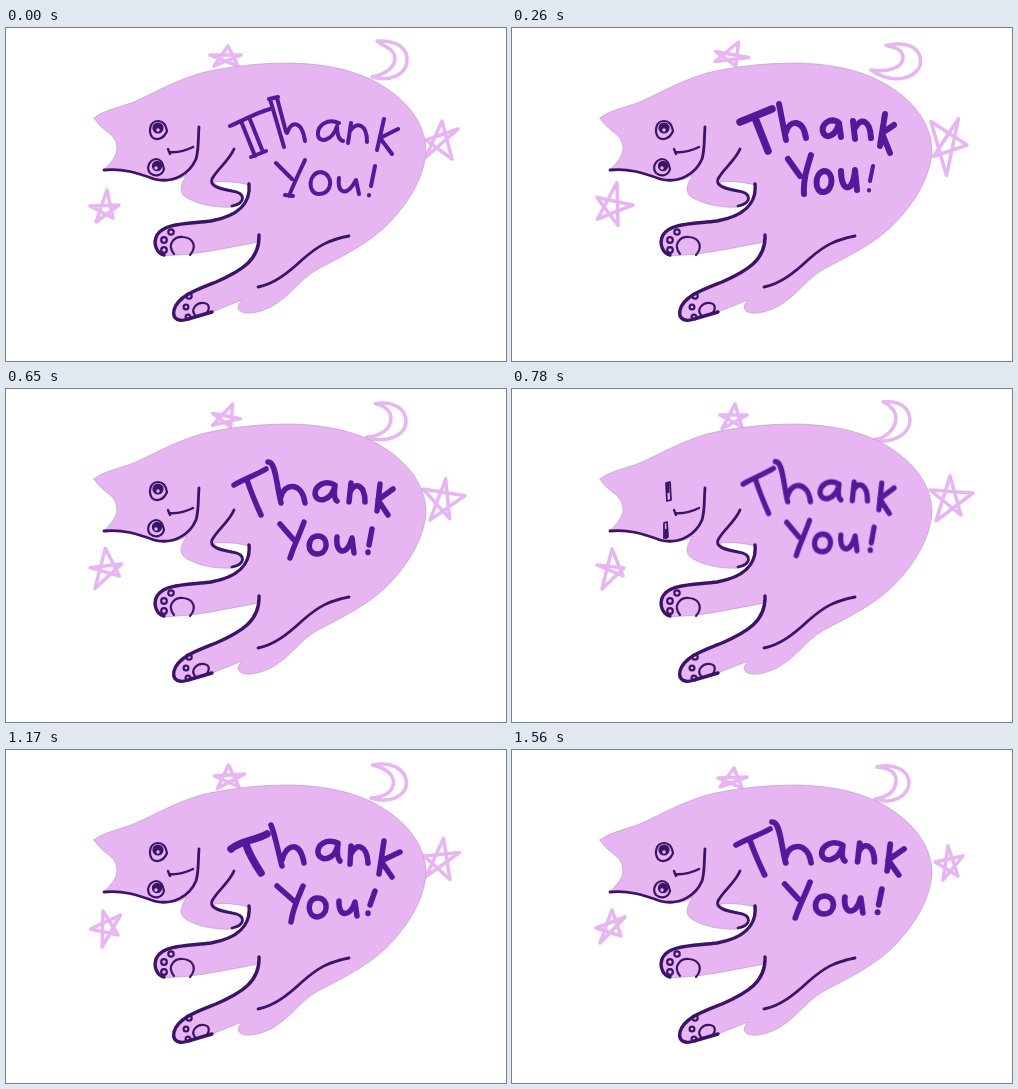
These frames come from a looping animation (500 px wide and 333 px high, 1.69 s). An HTML page:

```html
<!DOCTYPE html>
<html lang="en">
<head>
<meta charset="utf-8">
<title>Thank You!</title>
<style>
  html, body { margin: 0; width: 100%; height: 100%; overflow: hidden; background: #fff; }
  svg { display: block; width: 100vw; height: 100vh; }
  path, circle, ellipse { fill: none; stroke-linecap: round; stroke-linejoin: round; }
  .body { fill: #e6b5f2; stroke: #b894c4; stroke-width: .6; }
  .sky { stroke: #e6b5f2; stroke-width: 3.5; }
  .ink { stroke: #3b1468; stroke-width: 2.8; }
  .ink .limb { stroke-width: 3.4; }
  .ink .dot { fill: #3b1468; stroke: none; }
  .ink .glint { fill: #e6b5f2; stroke: none; }
  .text { stroke: #55189b; stroke-width: 5.5; }
  .text .thin { stroke-width: 4; }
  .text .bold { stroke-width: 6; }
  .heavy { stroke-width: 7.5; }

  .sky path, .text > *, .eyes { animation: 1.69s step-end infinite; }
  .text > *, .shut { opacity: 0; }

  #left { animation-name: left; }
  #top { animation-name: top; }
  #right { animation-name: right; }
  #moon { animation-name: moon; }
  .open { animation-name: open !important; }
  .shut { animation-name: shut !important; }
  #w1 { animation-name: w1; }
  #w2 { animation-name: w2; }
  #w3 { animation-name: w3; }
  #w4 { animation-name: w4; }
  #w5 { animation-name: w5; }
  #w6 { animation-name: w6; }

  @keyframes left {
    7.692% { d: path("M112 151L94 208L88 155L119 187L84 184Z"); animation-timing-function: steps(2); }
    23.076% { d: path("M98 158L118 187L82 184L123 167L87 198Z"); animation-timing-function: steps(3); }
    46.153% { d: path("M100 160L111 187L85 176L112 179L90 200Z"); animation-timing-function: steps(2); }
    61.538% { d: path("M95 157L113 184L83 180L114 161L96 199Z"); animation-timing-function: steps(2); }
    76.923% { d: path("M99 165L111 186L86 178L115 169L96 195Z"); animation-timing-function: steps(2); }
    92.307% { d: path("M100 160L109 186L84 178L113 167L88 193Z"); }
  }
  @keyframes top {
    7.692% { d: path("M219 13L234 38L203 26L240 22L207 38Z"); animation-timing-function: steps(2); }
    23.076% { d: path("M234 15L214 38L204 21L233 37L199 29Z"); animation-timing-function: steps(3); }
    46.153% { d: path("M223 15L230 38L208 26L235 26L210 40Z"); animation-timing-function: steps(2); }
    61.538% { d: path("M221 17L230 38L208 28L234 27L209 39Z"); animation-timing-function: steps(2); }
    76.923% { d: path("M224 13L236 36L209 24L243 21L214 38Z"); animation-timing-function: steps(2); }
    92.307% { d: path("M222 18L230 38L206 28L235 27L208 37Z"); }
  }
  @keyframes right {
    7.692% { d: path("M450 85L436 158L423 89L455 122L419 128Z"); animation-timing-function: steps(2); }
    23.076% { d: path("M443 96L433 137L415 98L455 112L424 129Z"); animation-timing-function: steps(3); }
    46.153% { d: path("M438 87L449 126L418 101L461 104L424 132Z"); animation-timing-function: steps(2); }
    61.538% { d: path("M438 90L445 129L419 111L452 102L420 129Z"); animation-timing-function: steps(2); }
    76.923% { d: path("M437 87L443 130L417 101L455 103L420 124Z"); animation-timing-function: steps(2); }
    92.307% { d: path("M436 96L446 126L423 112L451 106L431 130Z"); }
  }
  @keyframes moon {
    7.692% { d: path("M382 17C405 12 415 20 413 34C411 50 385 62 359 41C375 45 395 40 395 28C394 22 388 20 382 17Z"); animation-timing-function: steps(2); }
    23.076% { d: path("M366 18C385 13 404 20 404 35C404 48 380 55 359 43C375 44 388 40 387 30C386 20 376 18 366 18Z"); animation-timing-function: steps(3); }
    46.153% { d: path("M371 13C388 11 398 19 398 32C397 46 380 55 361 51C374 49 383 41 384 29C384 22 378 16 371 13Z"); animation-timing-function: steps(2); }
    61.538% { d: path("M368 16C388 12 401 20 402 32C402 45 385 52 366 47C378 46 388 42 388 32C387 22 378 18 368 16Z"); animation-timing-function: steps(2); }
    76.923% { d: path("M365 14C384 10 398 19 399 33C399 47 382 56 364 49C378 48 387 42 387 31C386 22 376 17 365 14Z"); animation-timing-function: steps(2); }
    92.307% { d: path("M365 17C382 13 396 20 397 32C397 46 381 55 363 49C376 47 384 41 384 30C384 22 376 18 365 17Z"); }
  }
  @keyframes open { 46.153% { opacity: 0; } 69.23% { opacity: 1; } }
  @keyframes shut { 46.153% { opacity: 1; } 69.23% { opacity: 0; } }
  @keyframes w1 { 0% { opacity: 1; } 7.692% { opacity: 0; } }
  @keyframes w2 { 7.692% { opacity: 1; } 23.076% { opacity: 0; } }
  @keyframes w3 { 23.076% { opacity: 1; } 46.153% { opacity: 0; } }
  @keyframes w4 { 46.153% { opacity: 1; } 61.538% { opacity: 0; } }
  @keyframes w5 { 61.538% { opacity: 1; } 84.615% { opacity: 0; } }
  @keyframes w6 { 84.615%, 100% { opacity: 1; } }
</style>
</head>
<body>
<svg viewBox="0 0 500 333" role="img" aria-label="Thank You!">
  <g class="sky">
    <path id="left" d="M101 162L107 190L84 178L113 177L90 194Z"/>
    <path id="top" d="M222 18L232 38L204 27L235 27L208 38Z"/>
    <path id="right" d="M436 93L446 131L420 112L452 101L420 129Z"/>
    <path id="moon" d="M371 13C392 12 402 21 401 33C400 47 384 54 366 49C379 46 388 40 389 31C389 21 380 20 371 13Z"/>
  </g>

  <path class="body" d="M88 90C97 82 116 79 130 73C150 64 168 53 195 45C224 38 254 35 285 35
    C325 36 360 44 387 65C409 82 420 102 420 124C418 150 402 177 378 200C358 218 335 229 312 241
    C294 251 286 267 265 279C250 286 235 288 232 280C232 276 235 274 236 272L206 284L182 291
    C174 294 166 292 168 282C172 268 190 262 210 254C235 243 254 232 253 214
    C230 218 208 223 185 226L158 228C152 226 146 217 151 207C158 195 180 196 205 193
    C232 188 245 175 243 157C232 154 220 153 208 154C209 157 214 159 225 162
    C240 165 240 176 226 179C215 180 195 178 181 170C172 165 174 157 181 147
    C172 153 159 154 150 152C132 145 116 140 98 142C104 135 111 129 111 120C110 104 98 106 88 90Z"/>

  <g class="ink">
    <path d="M98 142C116 140 132 145 148 151C168 156 184 145 190 131C193 121 192 110 193 99"/>
    <path d="M162 121L164 126M163 124C172 125 181 122 187 119" stroke-width="2.4"/>
    <path d="M228 121C223 133 211 141 206 151C203 158 214 161 226 163C240 165 240 175 226 178"/>
    <path class="limb" d="M243 156C245 175 232 188 205 193C180 196 158 195 151 207C146 217 152 226 158 227"/>
    <path class="limb" d="M253 207C254 232 235 243 210 254C190 262 172 268 168 282C166 292 174 294 182 291L206 284"/>
    <path d="M343 208C322 212 312 218 297 231C282 245 268 256 252 259"/>
    <g stroke-width="2.2">
      <circle cx="165" cy="204" r="2.7"/>
      <circle cx="158" cy="212" r="2.8"/>
      <circle cx="158" cy="222" r="2.8"/>
      <path d="M168 226C160 216 169 208 177 209C188 210 191 219 184 227"/>
      <circle cx="183" cy="268" r="2.7"/>
      <circle cx="180" cy="279" r="2.4"/>
      <circle cx="182" cy="289" r="2.4"/>
      <path d="M189 287C184 281 191 274 198 275C205 276 204 284 197 287"/>
    </g>
    <g class="eyes open" stroke-width="2.2">
      <path d="M152 93C144 93 142 103 146 109C150 113 158 111 161 103C160 97 157 93 152 93Z"/>
      <circle class="dot" cx="152" cy="100" r="5.6"/>
      <circle class="glint" cx="152" cy="102" r="1.7"/>
      <path d="M150 131C143 132 140 140 144 145C149 149 156 148 158 141C157 135 154 131 150 131Z"/>
      <circle class="dot" cx="151" cy="138" r="5.2"/>
      <circle class="glint" cx="150" cy="140" r="1.7"/>
    </g>
    <g class="eyes shut" stroke-width="1.8">
      <path d="M154 94L158 93L159 111L155 112ZM152 134L155 133L156 148L152 149Z"/>
      <path d="M156 94L156 103M154 141L154 149" stroke-width="2.6"/>
    </g>
  </g>

  <g class="text">
    <path id="w1" class="thin" d="M224 98C238 92 252 84 264 81M235 93L249 128M243 89L257 124M245 129L260 123
      M263 71L272 69M264 71L278 119M271 70L280 104M281 105C286 92 296 93 299 113
      M333 95C322 90 311 97 312 107C313 115 326 114 331 98C331 106 333 112 337 113
      M345 95L342 115M344 103C351 93 361 96 361 114M378 91L371 122M392 101L374 110L386 126
      M270 135L286 151M299 132C294 143 288 155 283 168M279 167L287 168
      M315 144C302 144 301 166 313 166C327 166 328 146 315 144M333 150C331 166 341 169 350 152L353 166
      M369 138L365 158M363 167v.5"/>
    <g id="w2">
      <path class="heavy" d="M228 94L260 81M243 90L256 123"/>
      <path class="bold" d="M267 76L274 112M274 104C278 91 291 91 294 110
        M326 94C317 89 309 97 311 104C314 112 324 108 327 95L329 109M341 93L343 111M343 100C349 89 358 92 359 110
        M373 86L368 118M382 97L370 105L378 125M276 131L288 148M299 127C295 140 291 152 292 166
        M312 143C302 145 302 165 312 164C322 162 322 143 312 143M329 143C329 164 341 166 343 142L345 162"/>
      <path class="thin" d="M361 138L358 153M357 162v.5"/>
    </g>
    <g id="w3">
      <path id="word" d="M228 96C238 90 250 86 260 80M241 91C245 103 250 115 255 126
        M262 73C270 73 270 94 275 114M275 108C278 94 296 92 299 114
        M329 96C319 90 309 97 309 105C311 115 325 112 329 97C328 104 328 110 331 112
        M345 94L343 113M344 103C349 92 359 96 359 113M374 95L371 122M387 100L372 111L382 126
        M274 135L287 150M298 133C294 145 288 156 284 169
        M312 147C301 147 300 165 311 165C323 165 323 147 312 147M331 148C329 165 341 168 346 149L348 164
        M366 140L363 156M362 163v.5"/>
    </g>
    <use id="w4" href="#word" transform="matrix(.95 0 0 .98 14.4 1)"/>
    <g id="w5">
      <path class="heavy" d="M225 99C236 90 248 91 261 84M239 92C243 104 249 114 255 123"/>
      <path d="M265 75C270 88 272 102 276 116M276 110C280 94 294 90 298 113
        M332 93C320 88 311 95 312 103C314 112 329 111 332 94C331 102 331 108 334 111
        M345 96L344 114M345 104C350 92 361 95 362 113M378 91L373 124M394 102L375 111L386 127
        M271 136L288 151M297 136C292 148 287 158 285 172
        M312 148C301 147 300 166 311 167C323 166 323 148 312 148M333 151C332 167 344 168 349 152L351 166
        M369 141L364 155M362 163v.5"/>
    </g>
    <use id="w6" href="#word" transform="matrix(1.056 0 0 1 -16.7 -1)"/>
  </g>
</svg>
</body>
</html>
```
